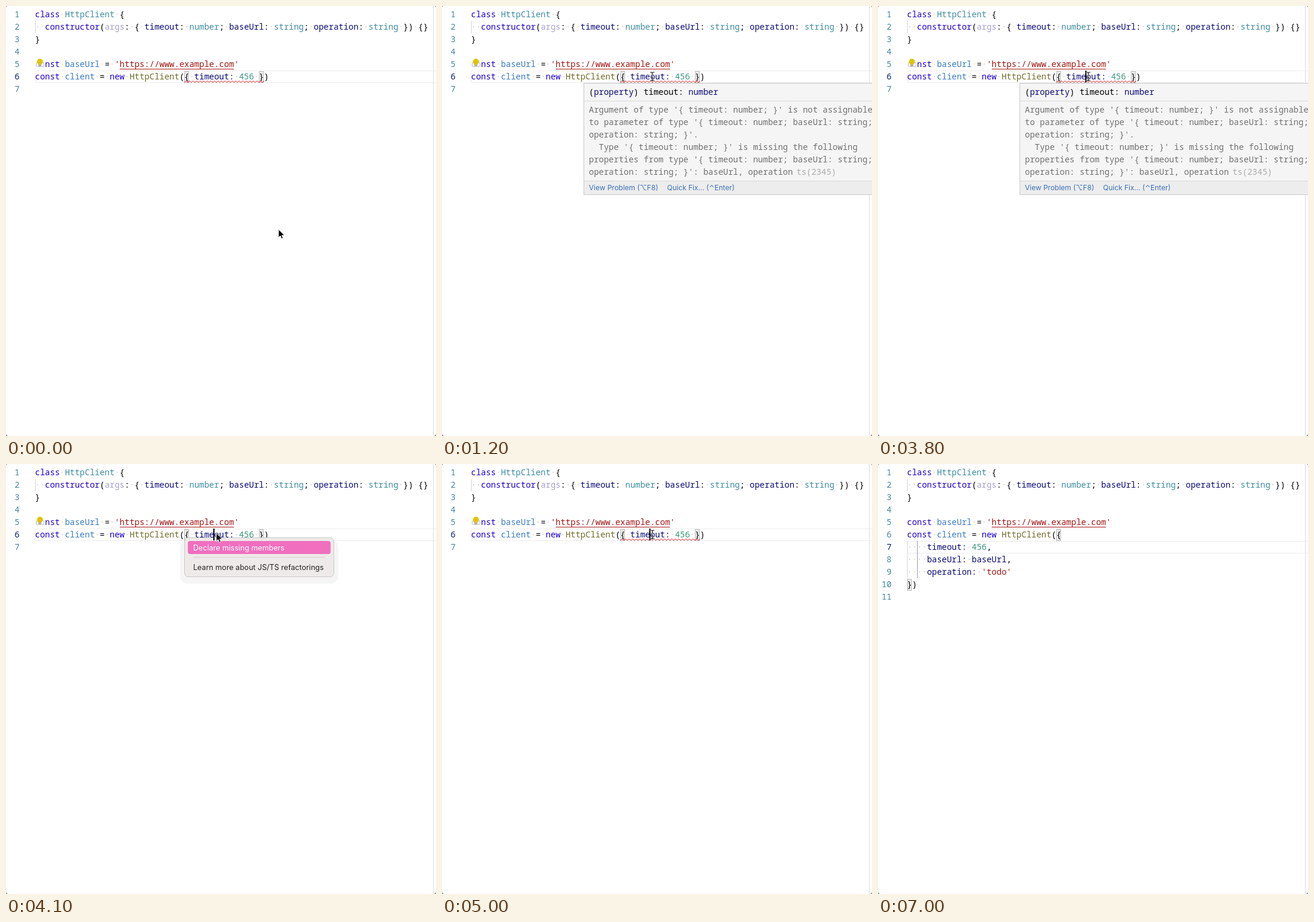
An HTML page that plays this animation: 726x726 px, repeating every 7.1 s.

```html
<!DOCTYPE html>
<html lang="en">
<head>
<meta charset="utf-8">
<title>Declare missing members</title>
<style>
  html, body { margin: 0; width: 100%; height: 100%; overflow: hidden; background: #fff; }
  svg { display: block; width: 726px; height: 726px; }
  text { font: 14px "Noto Sans Mono", "DejaVu Sans Mono", monospace; white-space: pre; font-variant-ligatures: none; }
  .ui { font: 12px Inter, "DejaVu Sans", sans-serif; }
  .menu { font-size: 12.6px; }
  .k { fill: #1c00cf; }
  .t { fill: #3f8ca0; }
  .a { fill: #a8a2cc; }
  .v { fill: #0a0a78; }
  .c { fill: #3b7cc4; }
  .f { fill: #706a28; }
  .n { fill: #3a977a; }
  .s { fill: #a31515; }
  .w { fill: #cbcbcb; }
  .h { fill: #c3c3d2; }
  .number { fill: #4585a0; text-anchor: end; }
  .active { fill: #0b216f; }
  .message { fill: #717171; }
  .faint { fill: #ababab; }
  .link { fill: #3a72b8; }
  .bracket { fill: #ececec; stroke: #bdbdbd; }
  .guide { stroke: #d6d6d6; }
  .guide.current { stroke: #9a9a9a; }
</style>
</head>
<body>
<svg id="stage" viewBox="0 0 726 726" xmlns="http://www.w3.org/2000/svg"></svg>
<script>
const LOOP = 7100;
const LEFT = 49, CHAR = 8.4, ROW = 21;
const rowTop = row => 4 + (row - 1) * ROW;
const column = n => LEFT + n * CHAR;

const text = (x, y, cls, content) => `<text x="${x}" y="${y}" class="${cls}">${content}</text>`;

// One-letter tags become coloured spans; spaces become visible dots.
const codeLine = (row, source) => text(LEFT, rowTop(row) + 15, '', source
  .replace(/ /g, '<w>·</w>')
  .replace(/<(\w)>/g, '<tspan class="$1">')
  .replace(/<\/\w>/g, '</tspan>'));

const codeBlock = (firstRow, lines) => lines.map((line, i) => codeLine(firstRow + i, line)).join('');

const lineNumbers = (count, active) => Array.from({ length: count }, (_, i) =>
  text(22.8, rowTop(i + 1) + 15, i + 1 === active ? 'number active' : 'number', i + 1)).join('');

const currentLine = row => `<path d="M726 ${rowTop(row) + .5}H49.5v20H726" fill="none" stroke="#ebebeb"/>`;

const bracket = (row, col) =>
  `<rect class="bracket" x="${Math.round(column(col)) + .5}" y="${rowTop(row) + 1.5}" width="7" height="19"/>`;

const guide = (x, row, rows, cls = '') =>
  `<path class="guide ${cls}" d="M${x} ${rowTop(row)}v${rows * ROW}"/>`;

const group = (id, content) => `<g id="${id}">${content}</g>`;

function squiggle(x, end, y) {
  let d = `M${x} ${y}`;
  for (let i = 0; x + i * 3 < end; i++) d += `l3 ${i % 2 ? 2.5 : -2.5}`;
  return `<path d="${d}" fill="none" stroke="#d8202a" stroke-width="1"/>`;
}

const shared = guide(49.5, 2, 1) + codeBlock(1, [
  '<k>class</k> <t>HttpClient</t> {',
  '  <k>constructor</k>(<a>args</a>: { <v>timeout</v>: <t>number</t>; <v>baseUrl</v>: <t>string</t>; <v>operation</v>: <t>string</t> }) {}',
  '}'
]) + '<path d="M192 106.5H385" stroke="#a31515"/>';

const urlLine = start => `${start} <c>baseUrl</c> = <s>'https://www.example.com'</s>`;
const clientLine = '<k>const</k> <c>client</c> = <k>new</k> <f>HttpClient</f>({';

const bulb = `<path d="M54.5 96h5v5l-1 1.5h-3l-1-1.5z" fill="#b9b08a"/>
  <circle cx="57.3" cy="94" r="5" fill="#dfc400"/>`;

const before = currentLine(6) + bracket(6, 30) + bracket(6, 45) + lineNumbers(7, 6) + codeBlock(5, [
  urlLine('<h>co</h><k>nst</k>'),
  clientLine + ' <v>timeout:</v> <n>456</n> })'
]) + squiggle(301, 435, 129) + bulb;

const after = currentLine(7) + guide(49.5, 7, 3) + guide(66.5, 7, 3, 'current')
  + bracket(6, 30) + bracket(10, 0) + lineNumbers(11, 7) + codeBlock(5, [
    urlLine('<k>const</k>'),
    clientLine,
    '    <v>timeout:</v> <n>456</n>,',
    '    <v>baseUrl:</v> <v>baseUrl</v>,',
    "    <v>operation:</v> <s>'todo'</s>",
    '})'
  ]);

const message = [
  "Argument of type '{ timeout: number; }' is not assignable",
  "to parameter of type '{ timeout: number; baseUrl: string;",
  "operation: string; }'.",
  "  Type '{ timeout: number; }' is missing the following",
  "properties from type '{ timeout: number; baseUrl: string;",
  "operation: string; }': baseUrl, operation"
];

const popup = `<rect x="239.5" y="130.5" width="500" height="188" fill="#f5f5f5" stroke="#c8c8c8"/>
  <rect x="240" y="296" width="486" height="22" fill="#ededed"/>
  <path d="M240 160.5H726M240 295.5H726" stroke="#d9d9d9"/>`
  + text(248, 150, '', '(<tspan class="v">property</tspan>) timeout: <tspan class="v">number</tspan>')
  + message.map((line, i) => text(248, 180 + i * ROW, 'message', line)).join('')
  + text(598.5, 285, 'faint', 'ts(2345)')
  + text(248, 311, 'ui link', 'View Problem (⌥F8)')
  + text(380, 311, 'ui link', 'Quick Fix... (⌃Enter)');

const menu = `<rect x="294" y="128" width="267" height="74" rx="13" fill="#000" opacity=".04"/>
  <rect x="301.5" y="124.5" width="252" height="66" rx="6" fill="#eeeae9" stroke="#cbc7c6"/>
  <rect x="307" y="130" width="241" height="22" rx="4" fill="#f06fbe"/>
  <path d="M316 157.5H539" stroke="#d5d1d0"/>`
  + text(316, 146, 'ui menu" fill="#fff', 'Declare missing members')
  + text(316, 179, 'ui menu" fill="#262424', 'Learn more about JS/TS refactorings');

const arrow = `<path d="M0 0V14L3.2 11L5.4 16L7.8 15L5.7 10.2H10.2Z"
  fill="#000" stroke="#fff" stroke-width="1" stroke-linejoin="round"/>`;

const beamPath = 'M-3.5 -7H-1.5Q0 -7 0 -5.5Q0 -7 1.5 -7H3.5M0 -6V6M-3.5 7H-1.5Q0 7 0 5.5Q0 7 1.5 7H3.5M-1.5 2.5H1.5';
const beam = `<path d="${beamPath}" fill="none" stroke="#fff" stroke-width="2.4"/>
  <path d="${beamPath}" fill="none" stroke="#000" stroke-width="1.1"/>`;

const stage = document.getElementById('stage');
stage.innerHTML = '<path d="M721.5 0V726" stroke="#dcdcdc"/>'
  + group('before', before) + group('after', after) + shared
  + group('popup', popup) + group('menu', menu)
  + '<rect id="caret" width="2" height="20" fill="#000"/>'
  + group('arrow', arrow) + group('beam', beam)
  + '<path d="M0 0h2L0 2zM726 0v2l-2 -2zM0 726v-3l3 3zM726 726h-3l3 -3z" fill="#999"/>';

const part = Object.fromEntries([...stage.querySelectorAll('[id]')].map(el => [el.id, el]));
const show = (el, visible) => el.setAttribute('display', visible ? 'inline' : 'none');
const place = (el, x, y) => el.setAttribute('transform', `translate(${x} ${y})`);
const within = (t, from, to) => t >= from && t < to;
const mix = (a, b, p) => a + (b - a) * p;

function ease(t, from, to) {
  const p = Math.min(1, Math.max(0, (t - from) / (to - from)));
  return p * p * (3 - 2 * p);
}

function caretVisible(t) {
  if (t < 600) return false;
  if (t < 4000) return (t - 600) % 1000 < 500;
  return t < 5700 || within(t, 6200, 6700);
}

function render(t) {
  const inserted = t >= 5200;
  const menuOpen = within(t, 4100, 5000);
  show(part.before, !inserted);
  show(part.after, inserted);
  show(part.popup, within(t, 900, 4100));
  show(part.menu, menuOpen);

  show(part.caret, caretVisible(t));
  place(part.caret, inserted ? 116 : 350, inserted ? 130 : 109);

  const approach = ease(t, 100, 700);
  const leave = ease(t, 5900, 6200);
  const x = mix(460, 355, approach);
  const y = mix(377, 119, approach) + leave * 156;
  const pointing = t < 600 || menuOpen;
  show(part.arrow, pointing);
  show(part.beam, !pointing && t < 6200);
  place(part.arrow, x, menuOpen ? 116.5 : y);
  place(part.beam, x, y);
}

const start = performance.now();
function tick() {
  render((performance.now() - start) % LOOP);
  requestAnimationFrame(tick);
}
render(0);
requestAnimationFrame(tick);
</script>
</body>
</html>
```
